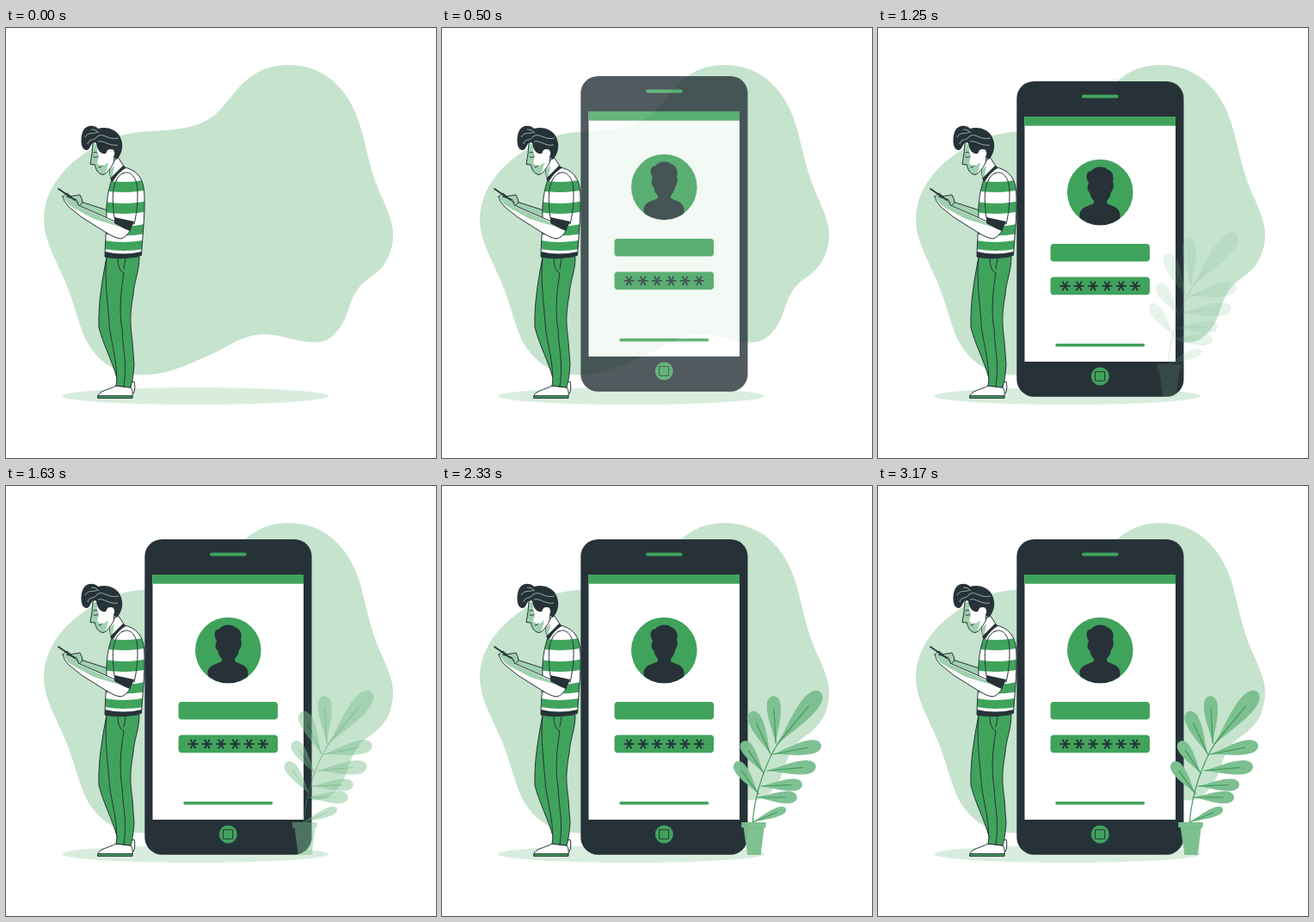
Write an HTML page that moves like this. It is 500 by 500 pixels and loops after 3.21 s.

```html
<!DOCTYPE html>
<html lang="en">
<head>
<meta charset="utf-8">
<title>Login illustration</title>
<style>
  html, body { margin: 0; width: 100%; height: 100%; overflow: hidden; background: #fff; }
  svg { display: block; width: 100%; height: 100%; }
  .dark { fill: #263238; }
  .green { fill: #40a35c; }
  .soft { fill: #9fd1ae; }
  .white { fill: #fff; }
  .ink { stroke: #263238; stroke-width: 1; stroke-linecap: round; stroke-linejoin: round; }
  .line { fill: none; }
  #leaves path, #pot { fill: #7cc090; }
  #leaves line, #stem { fill: none; stroke: #3f9a5a; stroke-width: 1.2; stroke-linecap: round; }
</style>
</head>
<body>
<svg viewBox="0 0 500 500">
  <defs>
    <clipPath id="avatarClip"><circle cx="258.3" cy="191" r="38.3"/></clipPath>
    <clipPath id="shirtClip"><use href="#shirtShape"/></clipPath>
    <clipPath id="sleeveClip"><use href="#sleeveShape"/></clipPath>
    <clipPath id="faceClip"><use href="#faceShape"/></clipPath>
    <path id="shirtShape" d="M137 162C150 164 158 173 160 185C163 205 159 238 157.5 264Q136 270 115 266C115 250 117 235 117 220C116 204 119 188 123 176Z"/>
    <path id="sleeveShape" d="M136 169C143 165 151 172 152.500 184C154 200 152 215 149 228L126 221C124 206 123 190 127 180Q130 171 136 169Z"/>
    <path id="faceShape" d="M101 134L100 146L98 158.500L103.500 159C104 164 107 170 113 170.500C118 169 121 164 125 157L127 140L112 130Z"/>
    <g id="stripes" fill="none" stroke="#40a35c"></g>
  </defs>

  <path fill="#c6e3ce" d="M329 43C374 43 402 76 413 118C420 145 425 170 434 190C441 207 452 226 450 246C447 272 434 283 421 292C398 308 401 331 388 349C380 360 371 365.500 360 365.500C337 365.500 319 356 301 356C275 356 257 372 233 382C206 394 186 403 159 403.500C127 403 105 387 92 361C83 340 80 322 69 295C56 265 44 246 44 221C45 186 70 158 100 140C124 125 145 121 170 120C200 118 222 117 243 101C266 81 278 43 329 43Z"/>
  <ellipse cx="220" cy="428" rx="155" ry="10" fill="#d9eddf"/>

  <g id="phone">
    <rect class="dark" x="161.300" y="62" width="194.200" height="366.700" rx="20"/>
    <rect class="white" x="170.500" y="103" width="175.500" height="285"/>
    <g class="green">
      <rect x="170.500" y="103" width="175.500" height="10.700"/>
      <rect x="237" y="77.500" width="42.500" height="4" rx="2"/>
      <circle cx="258.300" cy="191" r="38.300"/>
      <rect x="200.500" y="251" width="115.500" height="20.500" rx="4"/>
      <rect x="200.500" y="289.500" width="115.500" height="20.700" rx="4"/>
      <rect x="206.300" y="367" width="104" height="3.500" rx="1.700"/>
      <circle cx="258.300" cy="405" r="10.500"/>
    </g>
    <path class="dark" clip-path="url(#avatarClip)" d="M245 180C241 174 242 166 248 166.500C251 161 262 160 266 164C272 166 275 171 273 179C275 182 273 189 271 191C270 196 268 199 266 201V203C267 207 281 206 281.500 217V231H234.500V217C235.500 206 250 207 251 203V201C248 198 247 195 246 191C243 189 243 184 245 180Z"/>
    <rect class="ink line" x="253" y="399.700" width="10.600" height="10.600"/>
    <g id="stars" stroke="#263238" stroke-width="1.8"></g>
  </g>

  <g id="man">
    <!-- shoes and trousers -->
    <path class="white ink" d="M145 412L149 411Q151 420 148 425L143 426Z"/>
    <path class="white ink" d="M107 428C107 422 119 421 128 416L145 418Q148 422 147 428Z"/>
    <rect class="green ink" x="107" y="427.700" width="40" height="2.700"/>
    <path class="green ink" d="M117 266H155C155 283 149 294 148 310C143 338 145 346 147 365L149 392Q148 408 145 418L128 416L129 407C123 386 113 368 108 348C107 320 112 293 117 266Z"/>
    <path class="ink line" d="M117 268C114 292 119 325 120.500 350C124 372 129 389 128.500 407M130 268Q130 282 137 285C134 302 131 330 135 350C136 376 141 388 137 417M139 268L137 280"/>
    <!-- far arm -->
    <path class="soft ink" d="M84 201L118 212V222L85 208Z"/>
    <!-- neck and shirt -->
    <path class="white ink" d="M120 162L121 171L124 177L138 162L130 150Z"/>
    <path class="soft" d="M120.500 165L126 160Q125 169 123 174L121 171Z"/>
    <use href="#shirtShape" class="white"/>
    <use href="#stripes" clip-path="url(#shirtClip)"/>
    <use href="#shirtShape" class="ink line"/>
    <path class="dark" d="M115 260Q136 265 157.700 260L157.300 265Q137 270.500 115 266.500ZM121 175L136 160L140 162.500Q131 167 124 179Z"/>
    <!-- near arm -->
    <path class="white ink" d="M66 196L71 192L78 198L86 207L127 225L145 234Q140 244 133 245Q126 244 115 237L88 220L73 208Q67 202 66 196Z"/>
    <path class="soft" d="M67 196L71 193L78 199L86 208L126 226L132 231L102 222L80 210Q70 205 67 196Z"/>
    <use href="#sleeveShape" class="white"/>
    <use href="#stripes" clip-path="url(#sleeveClip)"/>
    <use href="#sleeveShape" class="ink line"/>
    <path class="dark" d="M126 220L149 225L144 236Q136 233 126 227Z"/>
    <!-- hands and handset -->
    <path class="soft ink" d="M71 196L80 195L86 194Q89 199 89 203L85 207L82 200Z"/>
    <path class="ink line" style="stroke-width:1.700" d="M61 187L72 194.500L80 200"/>
    <!-- head -->
    <use href="#faceShape" class="white"/>
    <path class="soft" clip-path="url(#faceClip)" d="M95 132L106 136Q105 143 108 150L106 157Q111 164 119 156Q117 168 113 172L95 166Z"/>
    <use href="#faceShape" class="ink line"/>
    <path class="ink line" d="M102 150Q105 152 107 149M102 145Q104 143 106 145M108 162Q111 162 112 160"/>
    <path class="dark" d="M89 139C86 132 88 122 90 119C94 112 103 113 107 117C117 114 131 118 134 130C137 139 134 147 129 153L125 150C127 143 122 139 118 142L116 146C110 147 106 142 105 134C102 131 100 134 98 138C96 143 92 143 89 139Z"/>
    <path class="white" d="M118 151C117 144 121 139 125 142Q128 147 123 152Z"/>
    <path class="line" stroke="#c7e4d0" stroke-width=".7" d="M92 127C96 120 101 124 106 121M95 135C96 128 103 132 106 126C114 121 118 131 131 128M107 132C114 130 120 138 130 136M99 118Q104 117 108 122"/>
  </g>

  <g id="plant">
    <path id="stem" d="M362 392C364 358 378 319 393 297Q410 272 428 251"/>
    <g id="leaves"></g>
    <path id="pot" d="M349 391H377.500V397H375.500L371.500 429H356L351.500 397H349Z"/>
    <path class="line" stroke="#6cb683" stroke-width=".8" d="M351.500 397.300H375.500"/>
  </g>
</svg>
<script>
const LOOP = 3210, FPS = 24;
const byId = id => document.getElementById(id);

// Password asterisks
byId('stars').innerHTML = Array.from({ length: 6 }, (_, i) =>
  [0, 60, 120].map(a =>
    `<path d="M-6 0H6" transform="translate(${217.5 + i * 16.3} 300) rotate(${a})"/>`).join('')).join('');

// Shirt stripes: [centre y, thickness]
byId('stripes').innerHTML = [[183, 12], [208, 12], [234, 11], [252, 10]].map(([y, w]) =>
  `<path stroke-width="${w}" d="M110 ${y - 1}Q136 ${y + 5} 165 ${y - 1}"/>`).join('');

// Leaf with a narrow base at (x, y) and a round tip at (tx, ty)
function leaf([x, y, tx, ty, width]) {
  const l = Math.hypot(tx - x, ty - y), h = width / 2;
  const angle = Math.atan2(ty - y, tx - x) * 180 / Math.PI;
  return `<g transform="translate(${x} ${y}) rotate(${angle})">
    <path d="M0 0C${.35 * l} ${-.5 * h} ${.55 * l} ${-1.1 * h} ${.8 * l} ${-h}C${1.06 * l} ${-.9 * h} ${1.06 * l} ${.9 * h} ${.8 * l} ${h}C${.55 * l} ${1.1 * h} ${.35 * l} ${.5 * h} 0 0Z"/>
    <line x2="${.72 * l}"/></g>`;
}

byId('leaves').innerHTML = [
  [391, 300, 441, 239, 20],
  [389, 299, 386, 244, 16],
  [383, 312, 360, 262, 16],
  [375, 334, 350, 297, 14],
  [369, 358, 342, 321, 14],
  [386, 312, 442, 301, 16],
  [379, 331, 436, 326, 16],
  [372, 349, 420, 347, 14],
  [367, 362, 414, 362, 14],
  [362, 391, 401, 375, 10]
].map(leaf).join('');

// cubic-bezier(.36, -.01, .5, 1.38), solved by bisection
function overshoot(x) {
  if (x <= 0) return 0;
  if (x >= 1) return 1;
  const curve = (s, a, b) => 3 * (1 - s) ** 2 * s * a + 3 * (1 - s) * s * s * b + s ** 3;
  let lo = 0, hi = 1;
  for (let i = 0; i < 30; i++) {
    const mid = (lo + hi) / 2;
    if (curve(mid, .36, .5) < x) lo = mid; else hi = mid;
  }
  return curve(lo, -.01, 1.38);
}

function slideIn(node, progress, dx, dy) {
  const left = 1 - progress;
  node.setAttribute('transform', `translate(${dx * left} ${dy * left})`);
  node.setAttribute('opacity', progress < .025 ? 0 : Math.min(1, progress));
}

function draw(ms) {
  const t = Math.floor((ms + 5) * FPS / 1000) * 1000 / FPS;
  slideIn(byId('phone'), overshoot((t + 30) / 1000), 0, -30);
  slideIn(byId('plant'), overshoot((t - 705) / 2500), -30, 0);
}

const start = performance.now();
function tick() {
  draw((performance.now() - start) % LOOP);
  requestAnimationFrame(tick);
}
tick();
</script>
</body>
</html>
```
